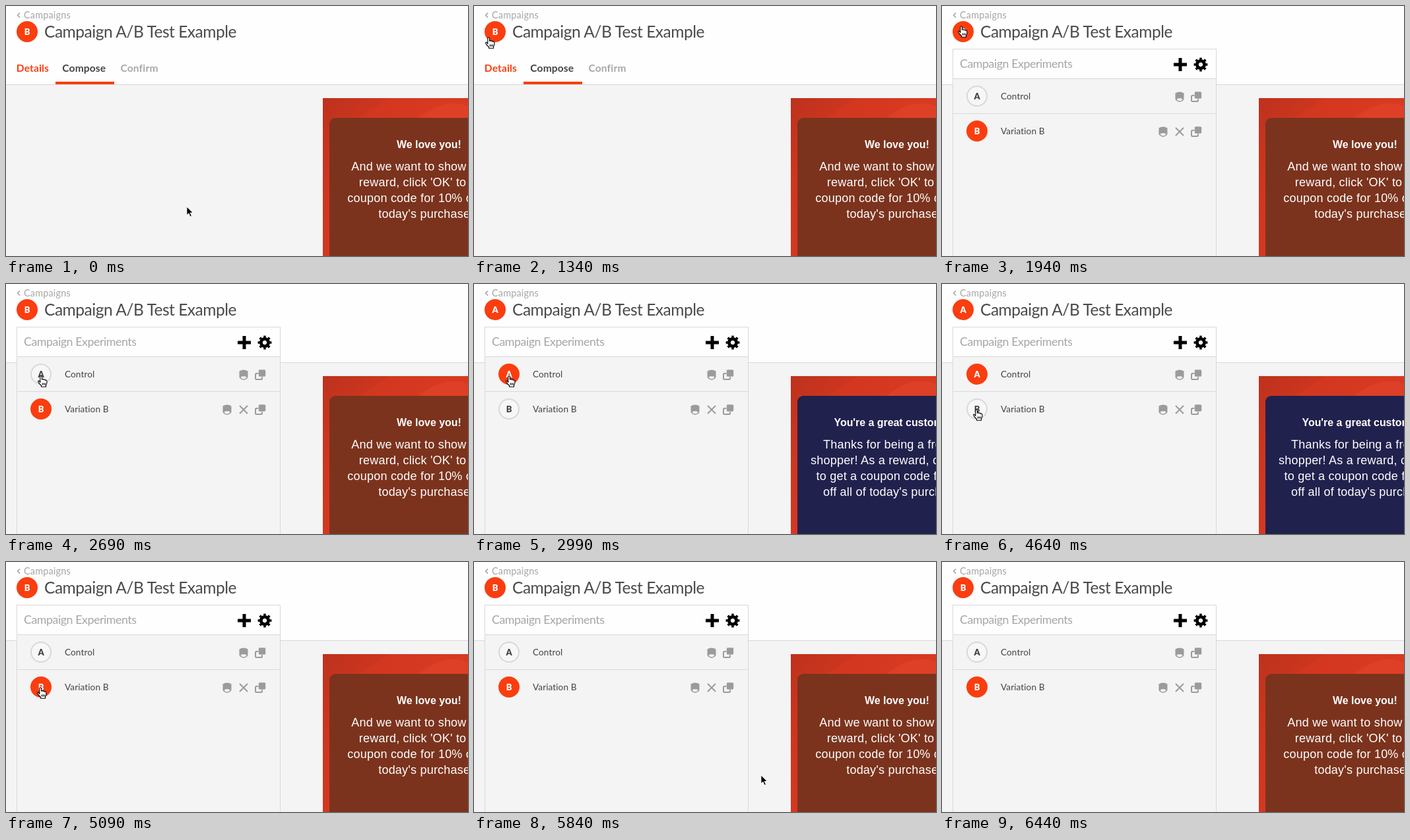
An HTML page for the animation above (6780 ms loop, 700 px wide and 380 px high).

```html
<!DOCTYPE html>
<html lang="en">
<head>
<meta charset="utf-8">
<title>Campaign A/B test</title>
<style>
  html, body { margin: 0; width: 100%; height: 100%; overflow: hidden; background: #f4f4f4; }
  svg { display: block; width: 700px; height: 380px; font-family: Lato, sans-serif; }
  .title { font-size: 24.5px; letter-spacing: -.46px; fill: #4a4a4a; }
  .crumb { font-size: 14.4px; letter-spacing: .2px; fill: #a6a6a6; }
  .tab { font-size: 15.5px; font-weight: 700; letter-spacing: .17px; }
  .heading { font-size: 17.8px; letter-spacing: -.44px; fill: #a6a6a6; }
  .row { font-size: 13.6px; letter-spacing: .09px; fill: #444; }
  .badge text { font-size: 13px; font-weight: 900; text-anchor: middle; fill: #444; }
  .badge circle { r: 15px; fill: #f7f7f7; stroke: #d8d8d8; stroke-width: 2; }
  .badge.on text { fill: #fff; }
  .badge.on circle { fill: #fa3e10; stroke: #fa3e10; }
  .offer { font: 18px "Liberation Sans", Arial, sans-serif; letter-spacing: .22px; fill: #fff; }
  .offer .bold { font-size: 15.9px; font-weight: 700; letter-spacing: 0; }
</style>
</head>
<body>
<svg viewBox="0 0 700 380">
  <defs>
    <linearGradient id="red" x1="0" y1="0" x2=".6" y2=".5">
      <stop offset="0" stop-color="#bd321d"/>
      <stop offset=".5" stop-color="#d0361f"/>
      <stop offset="1" stop-color="#d63922"/>
    </linearGradient>
    <g id="shield">
      <path d="M-6.500 -5.500Q0 -9.500 6.500 -5.500V3.500Q5.500 6.500 0 8Q-5.500 6.500 -6.500 3.500Z" fill="#9b9b9b"/>
      <path d="M-4.500 3.300Q0 1 4.500 3.300L2.800 5.700Q0 6.800 -2.800 5.700Z" fill="#f4f4f4"/>
    </g>
    <g id="copy">
      <rect x="-7" y="-2" width="10" height="9" rx="1.500" fill="none" stroke="#9b9b9b" stroke-width="2"/>
      <rect x="-2.500" y="-8" width="11" height="11" rx="2" fill="#9b9b9b" stroke="#f4f4f4" stroke-width=".6"/>
    </g>
    <path id="arrow" d="M1.800 .6V14.400L4.900 11.500L7.100 16.600L9.600 15.600L7.400 10.600H11.800Z"
          fill="#000" stroke="#fff" stroke-width="1.100"/>
    <path id="hand" d="M3.800 10.500V2.200C3.800 .3 6.500 .3 6.500 2.200V6.300C6.900 5 9 5.200 9.100 6.700
          C9.600 5.600 11.500 5.900 11.600 7.400C12.200 6.600 13.900 7 13.900 8.600V11.600L12.500 15V17.300H5.600V15.500
          L2.100 12L.8 9.700C.1 8.400 1.500 7.500 2.500 8.600Z
          M7.300 11.500V14.500M9.300 11.500V14.500M11.300 11.500V14.500"
          fill="#fff" stroke="#000" stroke-width="1.100" stroke-linejoin="round"/>
  </defs>

  <rect width="700" height="380" fill="#f4f4f4"/>
  <rect width="700" height="119" fill="#fefefe"/>
  <rect y="119" width="700" height="1" fill="#d8d8d8"/>
  <path d="M21 10.500L17.500 14L21 17.500" fill="none" stroke="#999" stroke-width="1.300"/>
  <text class="crumb" x="27" y="19">Campaigns</text>
  <text class="title" x="58" y="48">Campaign A/B Test Example</text>
  <text class="tab" x="15.800" y="100" fill="#fa3e10">Details</text>
  <text class="tab" x="85.300" y="100" fill="#444">Compose</text>
  <text class="tab" x="173.500" y="100" fill="#a8a8a8">Confirm</text>
  <rect x="75" y="115" width="89" height="4" fill="#fa3e10"/>
  <g class="badge on" transform="translate(32 39)"><circle/><text id="current" y="4.700"></text></g>

  <rect x="480" y="140" width="220" height="240" fill="url(#red)"/>
  <path d="M535 170L580 140H700V170Z" fill="#da3b21" opacity=".4"/>
  <path d="M625 170Q665 138 700 152V170Z" fill="#e2452a" opacity=".6"/>
  <rect id="card" x="490" y="170" width="300" height="240" rx="9"/>
  <g id="offerA" class="offer">
    <text class="bold" x="545.500" y="216">You're a great customer!</text>
    <text x="529" y="250">Thanks for being a frequent</text>
    <text x="510" y="274">shopper! As a reward, click</text>
    <text x="518.500" y="298">to get a coupon code for</text>
    <text x="529" y="322">off all of today's purchases</text>
  </g>
  <g id="offerB" class="offer">
    <text class="bold" x="592" y="216">We love you!</text>
    <text x="523.300" y="250">And we want to show you</text>
    <text x="534.800" y="274">reward, click 'OK' to get</text>
    <text x="517.300" y="298">coupon code for 10% off</text>
    <text x="564.200" y="322">today's purchases</text>
  </g>

  <g id="panel">
    <rect x="16.500" y="65.500" width="399" height="330" fill="#f4f4f4" stroke="#d8d8d8"/>
    <rect x="17" y="66" width="398" height="44" fill="#fefefe"/>
    <path d="M17 110.500H415M17 163.500H415" stroke="#d8d8d8"/>
    <text class="heading" x="27" y="94">Campaign Experiments</text>
    <path d="M351 89H371M361 79V99" stroke="#000" stroke-width="5"/>
    <g transform="translate(392 89)" fill="none" stroke="#000">
      <circle r="5.600" stroke-width="4.800"/>
      <circle r="8.400" stroke-width="4" pathLength="16" stroke-dasharray="1" stroke-dashoffset=".5"/>
    </g>
    <g id="badgeA" class="badge" transform="translate(53 137)"><circle/><text y="4.700">A</text></g>
    <text class="row" x="89" y="142">Control</text>
    <use href="#shield" x="360" y="138"/>
    <use href="#copy" x="385" y="138"/>
    <g id="badgeB" class="badge" transform="translate(53 190)"><circle/><text y="4.700">B</text></g>
    <text class="row" x="89" y="195">Variation B</text>
    <use href="#shield" x="335" y="191"/>
    <path d="M354 185L366 197M366 185L354 197" stroke="#9b9b9b" stroke-width="2"/>
    <use href="#copy" x="385" y="191"/>
  </g>
  <use id="cursor"/>
</svg>
<script>
  const LOOP = 6780;
  // Pointer samples: start time, left, top, shape
  const pointer = [
    [0, 272, 304, "arrow"],
    [1040, 166, 234, "arrow"],
    [1190, 20, 97, "hand"],
    [1340, 17, 47, "hand"],
    [1490, 24, 30, "hand"],
    [2240, 39, 67, "arrow"],
    [2390, 46, 101, "arrow"],
    [2540, 47, 125, "hand"],
    [2690, 48, 139, "hand"],
    [4190, 48, 145, "hand"],
    [4340, 48, 163, "hand"],
    [4490, 48, 187, "hand"],
    [4640, 47, 190, "hand"],
    [5690, 137, 211, "arrow"],
    [5840, 433, 323, "arrow"],
    [5990, 573, 364, "arrow"],
    [6290, 611, 376, "arrow"],
    [6440, 640, 400, "arrow"]
  ];
  const el = id => document.getElementById(id);
  const show = (id, visible) => el(id).setAttribute("visibility", visible ? "visible" : "hidden");

  function render(t) {
    const [, x, y, shape] = pointer.findLast(sample => sample[0] <= t);
    const cursor = el("cursor");
    cursor.setAttribute("href", "#" + shape);
    cursor.setAttribute("transform", `translate(${x} ${y})`);

    const control = t >= 2990 && t < 5090;
    show("panel", t >= 1940);
    show("offerA", control);
    show("offerB", !control);
    el("card").setAttribute("fill", control ? "#21214d" : "#7b331d");
    el("current").textContent = control ? "A" : "B";
    el("badgeA").classList.toggle("on", control);
    el("badgeB").classList.toggle("on", !control);
  }

  const start = performance.now();
  function tick() {
    render((performance.now() - start) % LOOP);
    requestAnimationFrame(tick);
  }
  tick();
</script>
</body>
</html>
```
